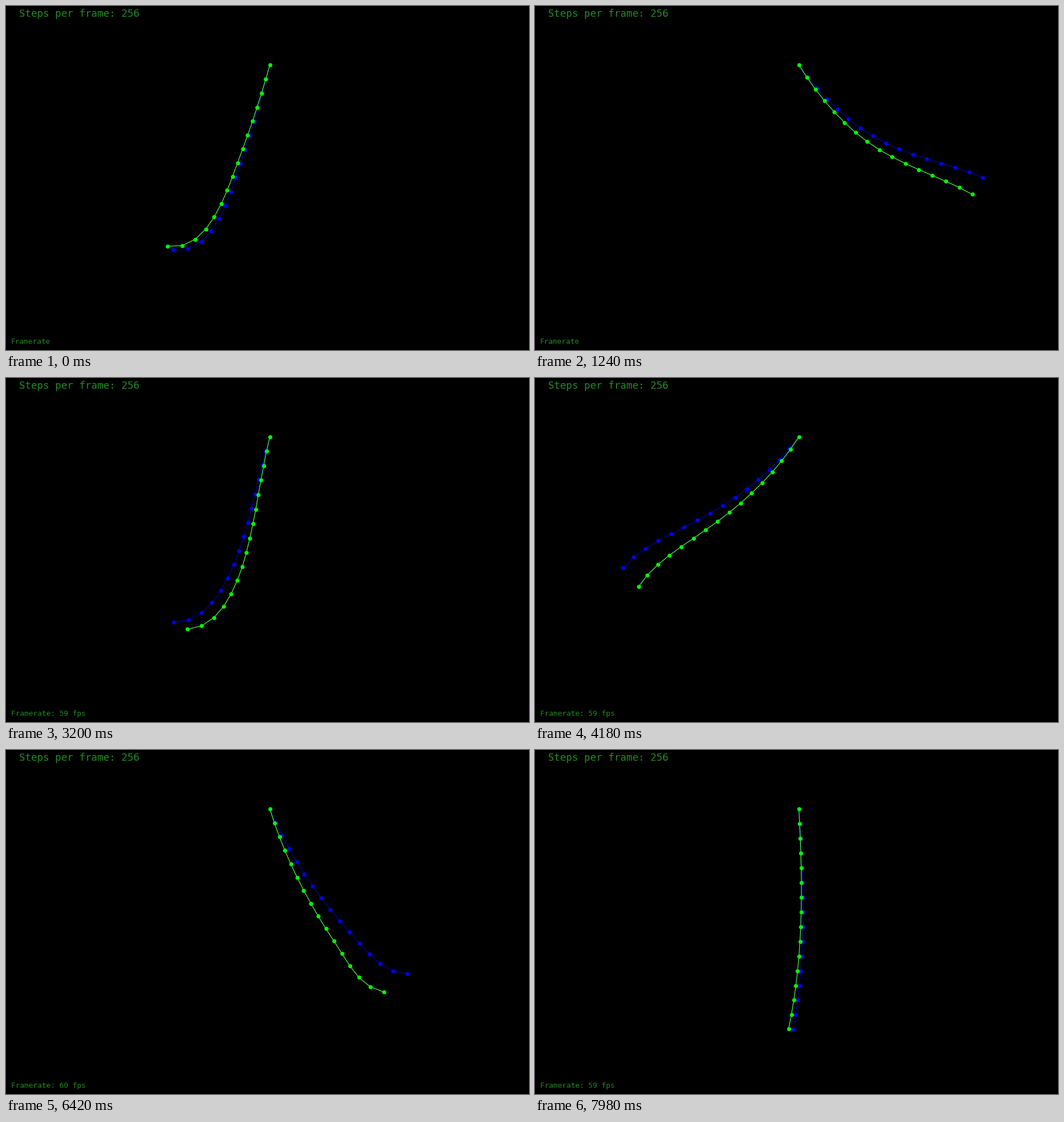
A matplotlib script for the animation above (8000 ms loop, 923 by 607 pixels).

```python
import numpy as np
import matplotlib.pyplot as plt
from matplotlib.animation import FuncAnimation

W, H, DPI = 923, 607, 100
PX = 72 / DPI
TICK, LOOP = 20, 8000
PIVOT = np.array([465.6, 104.0])
LINK = 26.0
LINKS = np.arange(15)
TEXT = "#228b22"


class Track:
    """Smooth curve through values at uneven positions."""

    def __init__(self, at, values):
        self.t, self.v = np.array(at, float), np.array(values, float)
        self.d = np.gradient(self.v, self.t, axis=0, edge_order=2)

    def __call__(self, t):
        i = int(np.clip(np.searchsorted(self.t, t) - 1, 0, len(self.t) - 2))
        h = self.t[i + 1] - self.t[i]
        u = (t - self.t[i]) / h
        ease = u * u * (3 - 2 * u)
        return (self.v[i] * (1 - ease) + self.v[i + 1] * ease
                + h * u * (1 - u) * ((1 - u) * self.d[i] - u * self.d[i + 1]))


def bend(*angles):
    """Degrees from straight down for each link, from five along the chain."""
    curve = Track([0, 5, 9, 12, 14], angles)
    return np.array([curve(i) for i in LINKS])


curl = bend(-16, -20, -24, -46, -88)
whip = bend(15, 23, 44, 75, 73)
reach = bend(34, 49, 64, 65, 60)
sag = bend(38, 52, 57, 52, 38)
hook = bend(-13, -11, -20, -41, -76)
drop = bend(-9, -15, -19, -14, -9)
rise = bend(18, 27, 33, 38, 69)
hang = bend(3, 0, -4, -8, -11)

# Each half swing returns the same bends mirrored and weaker.
swing = Track(*zip(
    (0, curl), (0.58, whip), (1.3, reach), (1.94, sag),
    (2.4, -1.08 * curl), (3.2, hook), (3.65, -0.86 * reach),
    (4.5, -0.78 * sag), (5.06, drop), (5.76, 0.36 * whip),
    (6.42, rise), (7.05, 0.63 * sag), (7.98, hang)))

# How far the second chain swings beyond the first, growing towards its tip.
lead = Track(*zip((0, 2), (0.58, 4), (1.94, 4.5), (3.2, -4.3),
                  (5.06, -4.2), (6.42, 7.9), (7.98, 1.2)))
lead_gain = 0.7 + 0.6 * LINKS / LINKS[-1]


def chain(angles):
    a = np.radians(angles)
    steps = LINK * np.column_stack([np.sin(a), np.cos(a)])
    return np.vstack([PIVOT, PIVOT + np.cumsum(steps, axis=0)]).T


def held_time(ms):
    """Pictures last 20, 100 and 20 ms in turn."""
    phase = ms % 140
    return ms - phase + (0 if phase < 20 else 20 if phase < 120 else 120)


def rate_label(ms):
    if ms < 1300:
        return "Framerate"
    return f"Framerate: {60 if 4300 <= ms < 7300 else 59} fps"


fig = plt.figure(figsize=((W + 0.01) / DPI, (H + 0.01) / DPI), dpi=DPI,
                 facecolor="black")
ax = fig.add_axes([0, 0, 1, 1])
ax.set_xlim(0, W)
ax.set_ylim(H, 0)
ax.axis("off")


def rope(line, dot, z):
    wire, = ax.plot([], [], color=line, lw=1.2 * PX, zorder=z)
    beads, = ax.plot([], [], "o", color=dot, ms=7.2 * PX, mew=0, zorder=z + 1)
    return wire, beads


def label(x, y, text, size):
    return ax.text(x, y, text, color=TEXT, family="DejaVu Sans Mono",
                   size=size * PX, va="baseline", zorder=9)


back = rope("#0000aa", "#0000f0", 1)
front = rope("#4cff4c", "#00ff00", 3)
label(22.5, 18.7, "Steps per frame: 256", 17.7)
rate = label(8.5, 596.3, "Framerate", 12.9)


def draw(n):
    ms = held_time(n * TICK)
    t = ms / 1000
    angles = swing(t)
    for parts, pose in ((front, angles), (back, angles + lead(t) * lead_gain)):
        xy = chain(pose)
        for part in parts:
            part.set_data(*xy)
    rate.set_text(rate_label(ms))
    return (*back, *front, rate)


anim = FuncAnimation(fig, draw, frames=LOOP // TICK, interval=TICK,
                     repeat=True, repeat_delay=0, blit=False)
plt.show()
```
